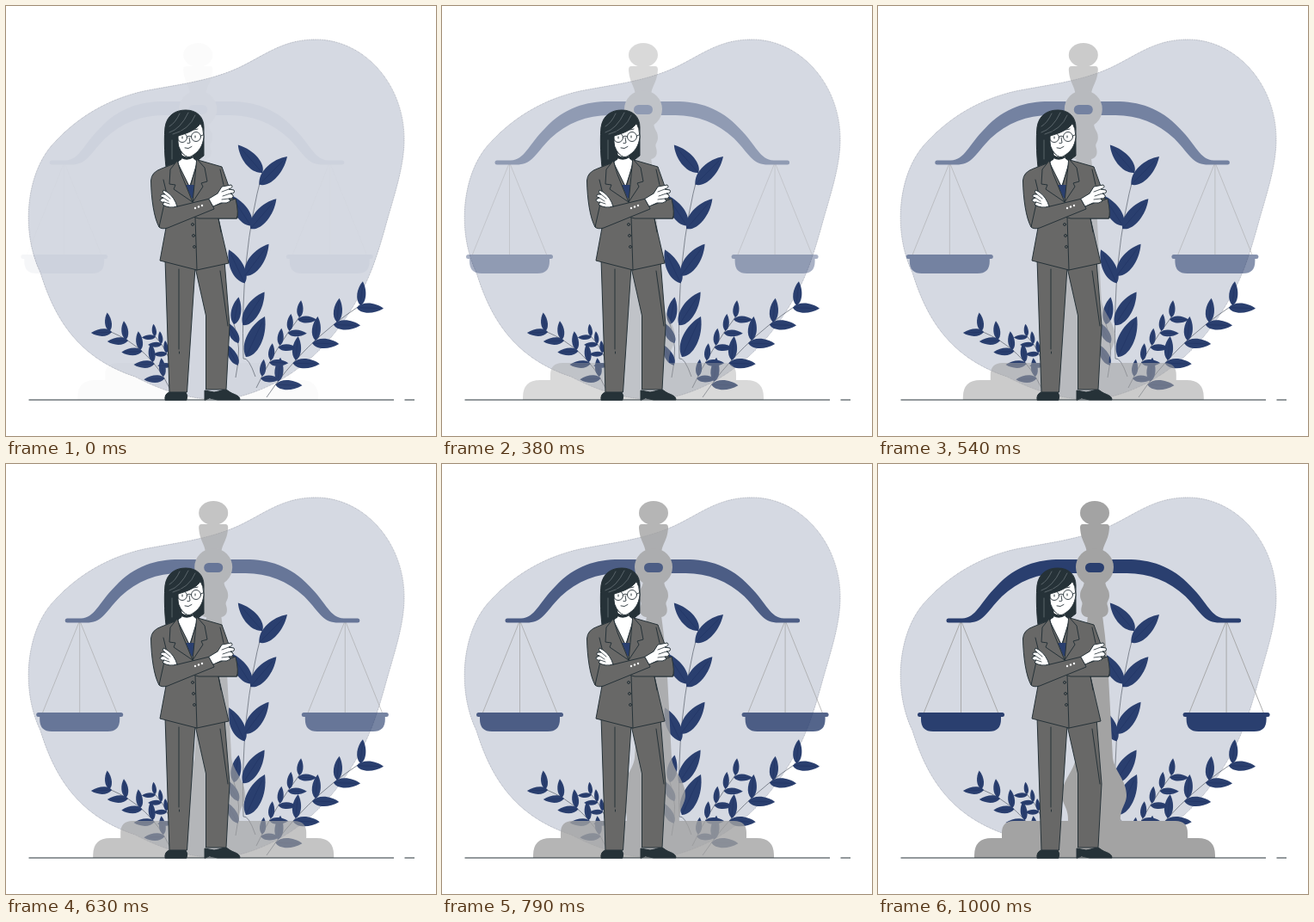
An HTML page for the animation above (1.04 s loop, 500x500 px).

```html
<!DOCTYPE html>
<html lang="en">
<head>
<meta charset="utf-8">
<title>Lawyer and scales</title>
<style>
  html, body { margin: 0; width: 100%; height: 100%; overflow: hidden; background: #fff; }
  svg { display: block; width: 100%; height: 100%; }
  .ink { stroke: #263238; stroke-width: 1; stroke-linejoin: round; stroke-linecap: round; }
  .line { fill: none; }
  .suit { fill: #686867; }
  .skin { fill: #fff; }
  .dark { fill: #263238; }
  .navy { fill: #2a3f6f; }
  .stem { fill: none; stroke: #5a606c; stroke-width: .7; }
  .vein { fill: none; stroke: #1f3160; stroke-width: .5; }
</style>
</head>
<body>
<svg viewBox="0 0 500 500">
  <path fill="#d5d9e2" stroke="#9298a4" stroke-width=".6" stroke-dasharray="1 .6" d="M357 39C415 37 463 90 463 155C463 185 453 215 443 250C432 290 423 318 405 347C375 398 330 440 268 455C230 462 190 452 150 431C80 408 55 358 40 310C16 260 24 190 58 157C85 128 120 108 160 99C195 92 235 88 270 72C300 58 320 40 357 39Z"/>
  <g id="plants"></g>

  <g id="scales">
    <defs>
      <g id="side">
        <path fill="none" stroke="#a3a3a3" stroke-width=".9" d="M53 290L96.500 182L140 290M96.500 182V290"/>
        <path class="navy" d="M82 179.500H98C114 179 118 162 138 142C160 118 186 111 212 111H232V127H212C187 127 163 136 144 154C124 175 122 184.500 104 184.500H82A2.500 2.500 0 0 1 82 179.500Z"/>
        <rect class="navy" x="46" y="289" width="101" height="5" rx="2.500"/>
        <path class="navy" d="M50 292H143V297Q143 311 129 311H64Q50 311 50 297Z"/>
      </g>
    </defs>
    <use href="#side"/>
    <use href="#side" transform="translate(501.600) scale(-1 1)"/>
    <g fill="#a3a3a3">
      <ellipse cx="252" cy="57" rx="17" ry="14"/>
      <path d="M238 70H266Q269 70 269 74C268 90 262 92 261 104H243C242 92 236 90 235 74Q235 70 238 70Z"/>
      <circle cx="252" cy="120" r="22"/>
      <path d="M240 134H264C264 145 269 144 269 153C269 159 265 160 267 165C269 172 267 177 261 178H243C237 177 235 172 237 165C239 160 235 159 235 153C235 144 240 145 240 134Z"/>
      <path d="M244 176H261L264 200L268 247L273 342C275 357 289 368 289 385C289 396 281 400 282 416H221C222 400 214 396 214 385C214 368 228 357 230 342L236 247Z"/>
      <path d="M112 458V455Q112 435 132 435H144V429Q144 415 158 415H346Q360 415 360 429V435H372Q392 435 392 455V458Z"/>
    </g>
    <rect class="navy" x="241" y="115" width="22" height="11" rx="5.500"/>
  </g>

  <path stroke="#263238" d="M26.500 458H451M463.500 458H475"/>

  <g class="ink">
    <path class="dark" d="M185 458Q184 451 190 449H209Q212 453 210 458ZM231 458V447L242 449C250 448 255 444 259 448C264 452 272 452 272 458H246L237 456Z"/>
    <path class="suit" d="M185 294L190 449H210.500L220 304L232.500 360V446H256L260 372L254 296Z"/>
    <path class="line" d="M201 306V399M201.500 402V404M249 308L258 372"/>
    <path class="dark" d="M186 187C184 170 184 150 185 141C187 127 197 121 209 121C222 121 230 129 230 141V174L221 181H198Z"/>
    <path class="skin" d="M204 169V178L197 183L213 212L223 181L218 177V169Z"/>
    <path class="dark" stroke="none" d="M204 173Q211 178 218 174V176Q211 181 204 177Z"/>
    <path class="skin" d="M199 151C207 147 218 143 225 134Q230 142 230 152C229 163 224 170 215 175Q211 177 206 172Q199 165 199 151Z"/>
    <path class="dark" d="M187 152C187 132 195 122 209 122C219 122 225 128 227 135C222 144 211 148 200 151V184H187Z"/>
    <path class="line" style="stroke:#7c868b;stroke-width:.6" d="M190 147Q203 143 212 124M194 149Q213 144 220 127M190 140Q197 136 202 125M193 156V178"/>
    <g class="line" stroke-width=".9">
      <circle cx="205" cy="153" r="5.500"/>
      <circle cx="221" cy="152" r="5.500"/>
      <path d="M210.500 152Q213 150 215.500 152M199.500 152L198 151M226.500 151L229 150M213 153L214 159Q213 160 211 159.500M208 165Q212 167 216 163.500M203 146L207 145.500M219 144L223 143"/>
    </g>
    <path class="line" d="M205 152V154M220 151V153"/>

    <path class="suit" d="M199 182L181 189Q169 193 168.500 203C169 225 172 246 178 257L186 258L179 296L222 307L259 299L247 247L269 247Q270 239 264 224L251 187L223 179L214 211Z"/>
    <path class="navy" stroke="none" d="M209 208H219V220L216 224Z"/>
    <path class="suit" d="M199 180L191 190L190 207L197 208L195 213L217 228L204 196ZM222 178L231 188L234 204L227 206L229 210L217 228L219 208Z"/>
    <path class="line" d="M217 228L220 245L222 307M183 202L190 231M249 190L253 208M187 245L186 258M247 247L250 263"/>
    <path class="suit" d="M246 231L267 224Q271 242 268 247H224L203 241L232 232Z"/>
    <path class="suit" d="M184 230L178 257Q181 260 188 258L242 236L237 224L200 233Z"/>
    <path class="skin" d="M199 233C197 226 193 220 187 216L183 214Q181 217 185 219L181 219Q178 222 183 223L179 225Q180 229 184 228L182 231Q190 236 199 233Z"/>
    <path class="skin" d="M236 224L246 218L251 210L262 208Q265 211 259 213L265 214Q267 218 261 218L264 220Q265 224 259 224L261 227Q257 230 250 229L241 233Z"/>
    <path class="line" stroke-width=".8" d="M185 219L191 224M183 223L189 227M184 228L190 230M259 213L251 216M261 218L252 221M259 224L251 225"/>
    <g id="buttons" class="line"></g>
  </g>
  <g id="studs" fill="#fff"></g>
</svg>
<script>
const LOOP = 1040, STEPS = 25, STEP_MS = 1000 / 24, TRAVEL = 30;
const byId = id => document.getElementById(id);
const plants = byId('plants'), scales = byId('scales');

function add(parent, tag, attributes) {
  const node = document.createElementNS('http://www.w3.org/2000/svg', tag);
  for (const name in attributes) node.setAttribute(name, attributes[name]);
  parent.append(node);
}

const mix = (a, b, t) => a + (b - a) * t;

function pointOn([start, bend, end], t) {
  return [0, 1].map(i => mix(mix(start[i], bend[i], t), mix(bend[i], end[i], t), t));
}

function addLeaf([x, y], degrees, length) {
  const angle = degrees * Math.PI / 180;
  const dx = Math.cos(angle) * length, dy = Math.sin(angle) * length;
  const at = (along, side) =>
    `${(x + dx * along - dy * side).toFixed(1)} ${(y + dy * along + dx * side).toFixed(1)}`;
  add(plants, 'path', { class: 'navy', d: `M${at(0, 0)}C${at(.1, .22)} ${at(.6, .26)} ${at(1, 0)}C${at(.7, -.22)} ${at(.2, -.26)} ${at(0, 0)}Z` });
  add(plants, 'path', { class: 'vein', d: `M${at(0, 0)}L${at(.85, 0)}` });
}

const addStem = ([start, bend, end]) =>
  add(plants, 'path', { class: 'stem', d: `M${start}Q${bend} ${end}` });

// Spaces leaves evenly on a stem from the top down; the angle changes by turn per leaf.
function addLeaves(stem, { count, top = 1, gap, angle, turn = 0, length }) {
  for (let i = 0; i < count; i++) {
    addLeaf(pointOn(stem, top - i * gap), angle + i * turn, length);
  }
}

// A side sprig has one row of upright leaves and one row pointing outwards.
function addSprig(stem, facing, count, length) {
  const gap = .85 / (count - 1);
  addStem(stem);
  addLeaves(stem, { count, gap, angle: -90 + facing * 6, length: length * .9 });
  addLeaves(stem, { count, gap, top: .97, angle: facing > 0 ? 2 : 178, length });
}

const tall = [[276, 410], [272, 290], [298, 194]];
const low = [[267, 432], [275, 395], [265, 370]];
addStem(tall);
addStem(low);
addStem([[290, 431], [282, 408], [276, 410]]);
addLeaves(tall, { count: 3, gap: .31, angle: -131, turn: 8, length: 43 });
addLeaves(tall, { count: 4, gap: .255, top: .93, angle: -45, turn: -4, length: 46 });
addLeaf([279, 408], -65, 52);
addLeaves(low, { count: 2, gap: .4, top: .6, angle: -118, length: 27 });
addLeaf(low[2], -80, 32);

addSprig([[303, 455], [345, 392], [412, 348]], 1, 5, 31);
addSprig([[291, 444], [313, 398], [341, 362]], 1, 5, 22);
addSprig([[190, 444], [168, 398], [120, 378]], -1, 5, 24);
addSprig([[194, 424], [187, 397], [173, 384]], -1, 4, 16);

for (let i = 0; i < 3; i++) {
  add(byId('buttons'), 'circle', { cx: 217 + i, cy: 254 + i * 13, r: 1.5 });
  add(byId('studs'), 'circle', { cx: 220 + i * 4, cy: 235 - i * 1.5, r: 1.2 });
}

function draw(ms) {
  const step = Math.min(STEPS - 1, Math.floor((ms % LOOP + 5) / STEP_MS));
  const progress = (step + 1) / STEPS;
  scales.setAttribute('opacity', progress);
  scales.setAttribute('transform', `translate(${TRAVEL * (progress - 1)})`);
}

const start = performance.now();
function tick() {
  draw(performance.now() - start);
  requestAnimationFrame(tick);
}
tick();
</script>
</body>
</html>
```
